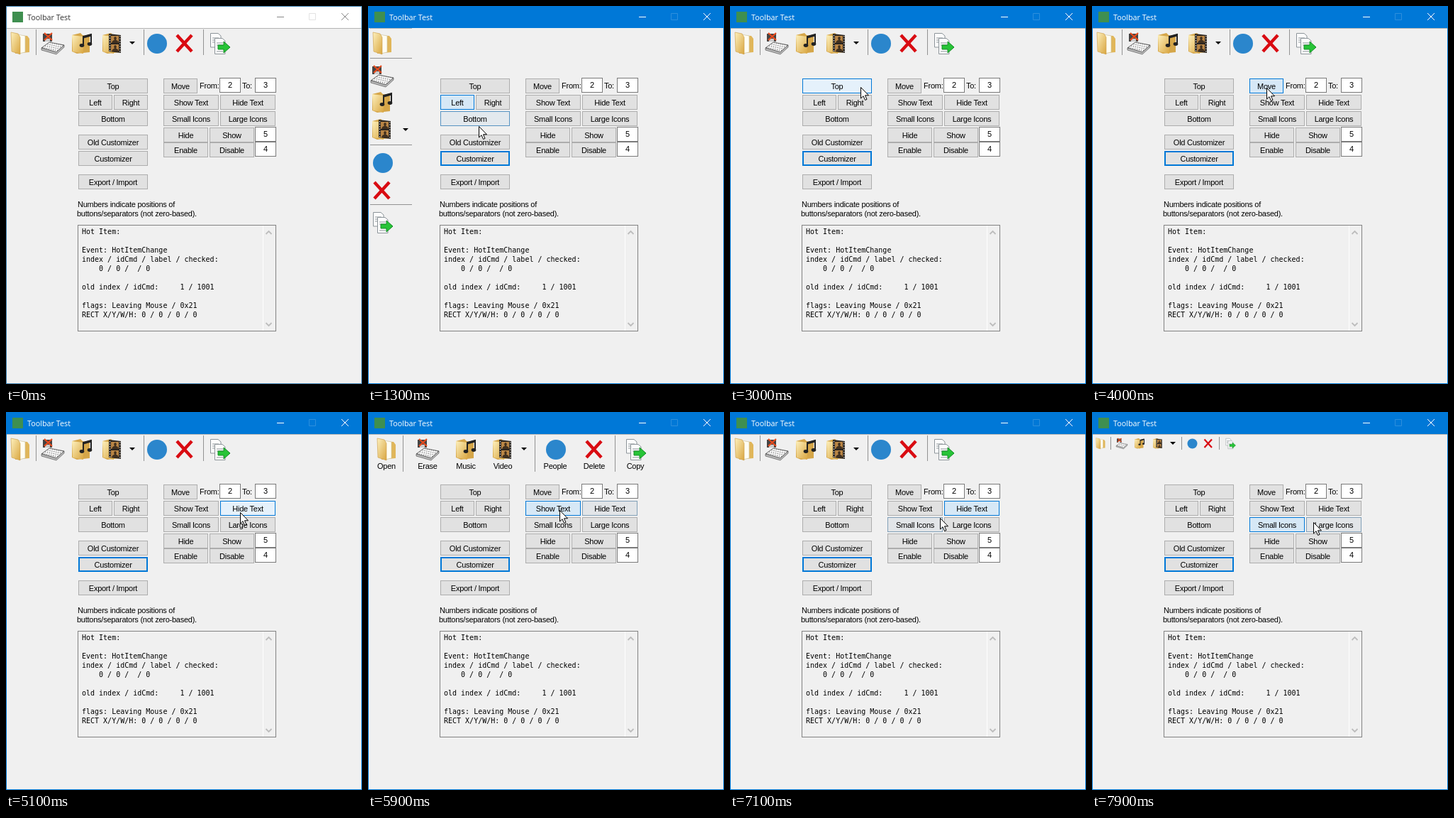
These frames come from a looping animation (502 by 532 pixels, 8 s). An HTML page:

```html
<!DOCTYPE html>
<html lang="en">
<head>
<meta charset="utf-8">
<title>Toolbar Test</title>
<style>
  html, body { margin: 0; width: 100%; height: 100%; overflow: hidden; background: #f0f0f0; }
  svg { display: block; }
  text { font: 11px "Liberation Sans", Arial, sans-serif; letter-spacing: -.25px; white-space: pre; }
  .mid { text-anchor: middle; }
  .title { font: 10.8px "Open Sans", sans-serif; letter-spacing: 0; }
  .log { font: 10px "DejaVu Sans Mono", monospace; letter-spacing: 0; }
  .line { fill: none; stroke-width: 1; }
</style>
</head>
<body>
<svg width="502" height="532" viewBox="0 0 502 532">
  <defs>
    <linearGradient id="gold" x2="1" y2="1">
      <stop stop-color="#fdf0bd"/><stop offset="1" stop-color="#d9a640"/>
    </linearGradient>
    <pattern id="dots" width="3" height="3" patternUnits="userSpaceOnUse" patternTransform="rotate(12)">
      <rect width="3" height="3" fill="#f6f6f6"/><rect width="1.1" height="1.1" fill="#555"/>
    </pattern>
    <g id="case">
      <path d="M2 5L14 2L17 5L27 7V29L9 31L2 28Z" fill="#d5a649"/>
      <path d="M2 5L18 7V31L3 28Z" fill="url(#gold)"/>
    </g>
    <g id="open">
      <path d="M8 5L26 6L29 10V29L9 31Z" fill="#e0b65a"/>
      <path d="M12 4L23 6V29L14 31Z" fill="#fffdf2" stroke="#cfc6a4" stroke-width=".7"/>
      <path d="M3 1L13 3L16 8V32L4 28Z" fill="url(#gold)" stroke="#c99b45" stroke-width=".6"/>
    </g>
    <g id="erase">
      <path d="M0 23L11 15L32 19L21 29Z" fill="url(#dots)" stroke="#444" stroke-width=".8"/>
      <path d="M0 23L21 29L32 19V22L21 32L0 26Z" fill="#bbb" stroke="#444" stroke-width=".6"/>
      <path d="M2 3H15V14H2Z" fill="#444"/><path d="M5 10H12V14H5Z" fill="#ccc"/>
      <path d="M4 2L15 12M15 2L4 12" stroke="#e84a1c" stroke-width="2.2"/>
    </g>
    <g id="music">
      <use href="#case"/>
      <path d="M18 19V7L29 4V17" fill="none" stroke="#222" stroke-width="2"/>
      <path d="M18 8L29 5" stroke="#222" stroke-width="3"/>
      <ellipse cx="16" cy="19.5" rx="3.3" ry="2.4" fill="#222"/>
      <ellipse cx="27" cy="17.5" rx="3.3" ry="2.4" fill="#222"/>
    </g>
    <g id="video">
      <use href="#case"/>
      <path d="M11 3L28 5V30L11 28Z" fill="#2b251f"/>
      <path d="M14 6H25V16H14ZM14 18H25V28H14Z" fill="#b98545"/>
      <path d="M15 16Q16 12 19 12Q17 8 20 7Q23 8 21 12Q24 12 25 16ZM15 28Q16 24 19 24Q17 20 20 19Q23 20 21 24Q24 24 25 28Z" fill="#41301f"/>
      <path d="M12.5 5V28M26.8 6V29" stroke="#ddd" stroke-width="1.2" stroke-dasharray="1.5 2"/>
    </g>
    <circle id="people" cx="17" cy="17" r="14" fill="#2b86cc"/>
    <path id="delete" d="M5 5L26 28M26 5L5 28" stroke="#d90b12" stroke-width="4.5"/>
    <g id="copy" fill="#fdfdfd" stroke="#8c9499">
      <path d="M3.5 2.5H14L18 6V22H3.5Z"/><path d="M6 9H15M6 12H15M6 15H15"/>
      <path d="M9.500 9.500H20L24 13V31.500H9.500Z"/><path d="M12 16H21M12 19H21M12 28H21"/>
      <path d="M14 19H22V14L31 22L22 30V25H14Z" fill="#27c437" stroke="#118a22"/>
    </g>
    <path id="pointer" d="M.5 .5V16L4 12.700L6.600 18.500L9 17.400L6.500 11.800H11.500Z" fill="#fff" stroke="#000"/>
  </defs>
  <g id="scene"></g>
</svg>
<script>
const LOOP = 8000, STEP = 100;
const BLUE = '#0078d7';
const scene = document.getElementById('scene');

const rect = (x, y, w, h, fill, stroke, weight = 1) => {
  const half = weight / 2;
  return `<rect x="${x + half}" y="${y + half}" width="${w - weight}" height="${h - weight}" fill="${fill}" stroke="${stroke}" stroke-width="${weight}"/>`;
};
const fillRect = (x, y, w, h, fill) => `<rect x="${x}" y="${y}" width="${w}" height="${h}" fill="${fill}"/>`;
const text = (x, y, s, cls = '', fill = '#000') => `<text x="${x}" y="${y}" class="${cls}" fill="${fill}">${s}</text>`;
const line = (d, stroke) => `<path class="line" d="${d}" stroke="${stroke}"/>`;

// label, x, y, width
const buttons = [
  ['Top', 102, 102, 98], ['Left', 102, 125, 48], ['Right', 152, 125, 48], ['Bottom', 102, 148, 98],
  ['Old Customizer', 102, 181, 98], ['Customizer', 102, 204, 98], ['Export / Import', 102, 237, 98],
  ['Move', 222, 102, 48], ['Show Text', 222, 125, 78], ['Hide Text', 302, 125, 78],
  ['Small Icons', 222, 148, 78], ['Large Icons', 302, 148, 78],
  ['Hide', 222, 171, 63], ['Show', 287, 171, 63], ['Enable', 222, 192, 63], ['Disable', 287, 192, 63]
];
const fields = [[2, 301, 101], [3, 351, 101], [5, 351, 170], [4, 351, 191]];
const log = ['Hot Item:', '', 'Event: HotItemChange', 'index / idCmd / label / checked:', '    0 / 0 /  / 0', '',
  'old index / idCmd:     1 / 1001', '', 'flags: Leaving Mouse / 0x21', 'RECT X/Y/W/H: 0 / 0 / 0 / 0'];

// time, pressed button, resulting toolbar layout
const clicks = [
  [0, '', 'top'], [1100, 'Left', 'left'], [1500, 'Bottom', 'bottom'], [2100, 'Right', 'right'], [2600, 'Top', 'top'],
  [3500, 'Move', 'moved'], [3900, 'Move', 'top'], [4200, 'Move', 'moved'], [4400, 'Move', 'top'],
  [5900, 'Show Text', 'labels'], [6200, 'Hide Text', 'top'], [6600, 'Show Text', 'labels'],
  [6900, 'Hide Text', 'top'], [7700, 'Small Icons', 'small']
];
// time, x, y of the pointer
const path = [
  [300, 240, 290], [900, 126, 139], [1100, 126, 140], [1300, 156, 169], [1500, 150, 160], [1700, 150, 160],
  [2000, 176, 137], [2100, 176, 137], [2300, 172, 119], [2500, 150, 113], [2800, 150, 113], [3300, 246, 115],
  [4500, 246, 115], [4900, 330, 141], [5500, 330, 141], [5800, 270, 138], [5900, 270, 138], [6100, 330, 141],
  [6400, 284, 134], [6600, 270, 138], [6800, 330, 138], [6900, 330, 138], [7300, 262, 160], [7700, 270, 158], [7900, 312, 155]
];

function pointerAt(t) {
  const i = path.findIndex(p => p[0] >= t);
  if (i < 1) return path[0].slice(1);
  const [a, b] = [path[i - 1], path[i]];
  const u = (t - a[0]) / (b[0] - a[0]), k = u * u * (3 - 2 * u);
  return [a[1] + (b[1] - a[1]) * k, a[2] + (b[2] - a[2]) * k];
}

const icons = ['open', 'erase', 'music', 'video', 'people', 'delete', 'copy'];
const large = { at: [4, 50, 91, 134, 196, 236, 285], seps: [42, 194, 278], arrow: [178, 52] };
const side = { at: [36, 82, 119, 157, 204, 243, 288], seps: [73, 195, 279], arrow: [53, 174], vertical: true };
const layouts = {
  top: large,
  bottom: { ...large, dy: 460 },
  left: side,
  right: { ...side, dx: 438 },
  moved: { ...large, at: [4, 43, ...large.at.slice(2)], seps: [85, 194, 278] },
  labels: { at: [10, 68, 122, 174, 248, 303, 361], seps: [49, 235, 348], arrow: [220, 52], labels: true, end: 84 },
  small: { at: [4, 34, 59, 85, 133, 156, 187], seps: [26, 126, 179], arrow: [114, 44], scale: .5, start: 35, end: 53 }
};

function toolbar({ at, seps, arrow, vertical, labels, dx = 0, dy = 0, scale = 1, start = 33, end = 69 }) {
  let out = line(vertical ? 'M2 31.5H62' : 'M1 31.5H501', '#b4b4b4');
  seps.forEach(s => out += line(vertical ? `M3 ${s + .5}H62` : `M${s + .5} ${start}V${end}`, '#929292'));
  icons.forEach((name, i) => {
    const [x, y] = vertical ? [4, at[i]] : [at[i], 36];
    out += `<use href="#${name}" transform="translate(${x} ${y}) scale(${scale})"/>`;
    if (labels) out += text(x + 16, 80, name[0].toUpperCase() + name.slice(1), 'mid');
  });
  out += `<path d="M${arrow[0] - 4} ${arrow[1] - 2}h8l-4 4z"/>`;
  return `<g transform="translate(${dx} ${dy})">${out}</g>`;
}

const mix = (a, b, k) => `rgb(${a.map((v, i) => Math.round(v + (b[i] - v) * k))})`;

function button([label, x, y, w], t, active, click) {
  const inside = ([px, py]) => px >= x && px <= x + w && py >= y && py <= y + 21;
  let hover = 0;
  for (let k = 0; active && k < 4; k++) hover += inside(pointerAt(t - k * STEP)) / 4;
  const pressed = click[1] === label && t - click[0] < 300;
  const focused = active && label === 'Customizer';
  const fill = pressed ? '#d6e8f6' : mix([225, 225, 225], [229, 241, 251], hover);
  const edge = pressed || focused ? BLUE : mix([173, 173, 173], [0, 120, 215], hover);
  return rect(x, y, w, 21, fill, edge, focused ? 2 : 1) + text(x + w / 2, y + 15, label, 'mid');
}

function titleBar(active) {
  const ink = active ? '#fff' : '#888';
  return fillRect(0, 0, 502, 31, active ? BLUE : '#fff')
    + fillRect(9, 8, 15, 15, '#3f8f50')
    + text(30, 20, 'Toolbar Test', 'title', active ? '#fff' : '#333')
    + line('M382 15.5H392', ink)
    + line('M427.5 10.5H436.500V19.500H427.500Z', active ? '#2d8fdd' : '#e3e3e3')
    + line('M473 10L483 20M483 10L473 20', ink);
}

function draw(t) {
  const active = t >= 300;
  const click = clicks.filter(c => c[0] <= t).pop();
  let out = fillRect(0, 0, 502, 532, '#f0f0f0') + titleBar(active) + toolbar(layouts[click[2]]);
  buttons.forEach(b => out += button(b, t, active, click));
  fields.forEach(([n, x, y]) => out += rect(x, y, 30, 21, '#fff', '#7a7a7a') + text(x + 15, y + 14, n, 'mid'));
  out += text(273, 116, 'From:') + text(333, 116, 'To:')
    + text(101, 283, 'Numbers indicate positions of')
    + text(100, 296, 'buttons/separators (not zero-based).')
    + rect(101, 308, 280, 150, '#f0f0f0', '#828282')
    + line('M362.500 309V457', '#fff')
    + `<path d="M366.500 321l4-4l4 4M366.500 446l4 4l4-4" fill="none" stroke="#bdbdbd" stroke-width="1.8"/>`;
  log.forEach((s, i) => out += text(107, 321 + i * 13, s, 'log'));
  out += rect(0, 0, 502, 532, 'none', active ? BLUE : '#3b7fb0');
  if (active) out += `<use href="#pointer" transform="translate(${pointerAt(t).map(Math.round)})"/>`;
  scene.innerHTML = out;
}

let shown = -1;
function tick(now) {
  const t = Math.floor(now % LOOP / STEP) * STEP;
  if (t !== shown) draw(shown = t);
  requestAnimationFrame(tick);
}
draw(0);
requestAnimationFrame(tick);
</script>
</body>
</html>
```
